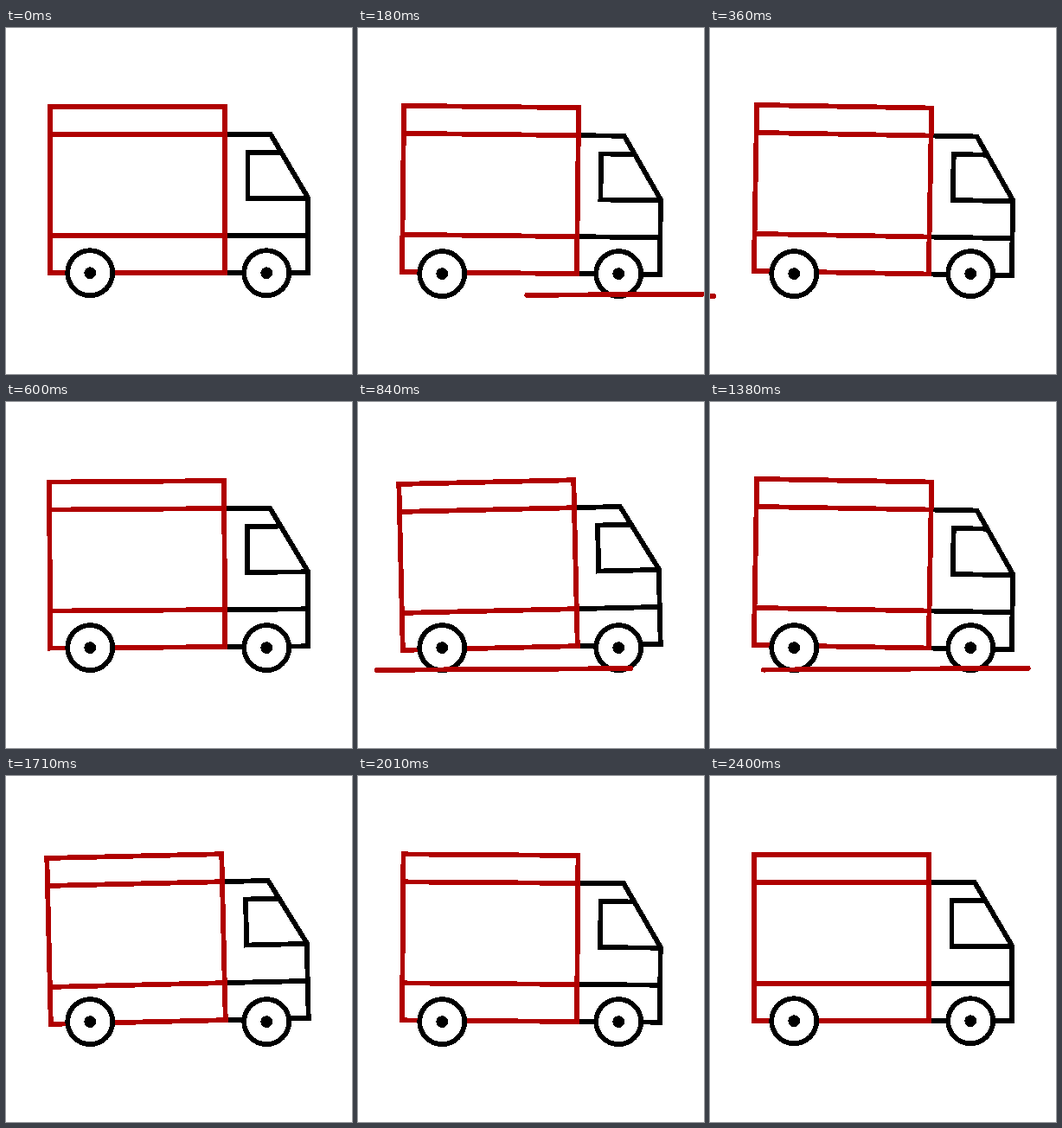
An HTML page that plays this animation: 400x400 px, repeating every 4460 ms.

```html
<!DOCTYPE html>
<html>
<head>
<meta charset="utf-8">
<style>
html, body { margin: 0; width: 100%; height: 100%; overflow: hidden; background: #fff; }
svg { display: block; width: 100%; height: 100%; }
</style>
</head>
<body>
<svg viewBox="0 0 400 400" fill="none" stroke="#000" stroke-width="5.8" shape-rendering="crispEdges">
  <g id="body">
    <path d="M253 123H306L349 196V283H253M253 240H349M317 144H279.500V197H349"/>
    <path stroke="#b00000" d="M51 91H253V283H51ZM51 123H253M51 240H253"/>
  </g>
  <g id="wheels">
    <g fill="#fff"><circle cx="97.200" cy="283.200" r="26"/><circle cx="301.200" cy="283.200" r="26"/></g>
    <g fill="#000" stroke="none"><circle cx="97.200" cy="283.200" r="6.900"/><circle cx="301.200" cy="283.200" r="6.900"/></g>
  </g>
  <path id="road" stroke="#b00000" stroke-linecap="round"/>
</svg>
<script>
const LOOP = 4460, PASS = 570, PASSES = 3;
const [body, wheels, road] = ['body', 'wheels', 'road'].map(id => document.getElementById(id));

// Rocking angle in degrees: [time, angle]
const rock = [[0, 0], [300, 1.02], [480, 1.02], [690, -1.35], [930, -1.35], [1110, 1.02],
  [1410, 1.02], [1620, -1.35], [1800, -1.35], [2070, 0.7], [2160, 0.7], [2400, 0]];

const clamp = x => Math.min(1, Math.max(0, x));
const smooth = x => x * x * (3 - 2 * x);

function angleAt(t) {
  const i = rock.findIndex(k => k[0] > t);
  if (i < 0) return 0;
  const [t0, a] = rock[i - 1], [t1, b] = rock[i];
  return a + (b - a) * smooth((t - t0) / (t1 - t0));
}

// The road sweeps left: its front slows down, its tail speeds up.
function drawRoad(t) {
  const u = t % PASS;
  const front = 1 - (1 - clamp((u - 120) / 205)) ** 2;
  const tail = clamp((u - 194) / 169) ** 2;
  const left = 403 - 410 * front, right = 399 - 404 * tail;
  const on = t < PASS * PASSES && u > 120 && u < 363;
  const y = x => 310 - x * 0.006;
  road.setAttribute('d', on ? `M${left} ${y(left)}L${Math.max(left, right)} ${y(right)}` : '');
}

function draw(t) {
  const angle = angleAt(t);
  const active = clamp(t / 90) * clamp((2400 - t) / 240);
  body.setAttribute('transform', `translate(${0.2 * active} ${0.5 * active}) rotate(${angle} 196 258)`);
  wheels.setAttribute('transform', `translate(0 ${0.9 * active})`);
  drawRoad(t);
}

const start = performance.now();
function tick() {
  draw((performance.now() - start) % LOOP);
  requestAnimationFrame(tick);
}
tick();
</script>
</body>
</html>
```
